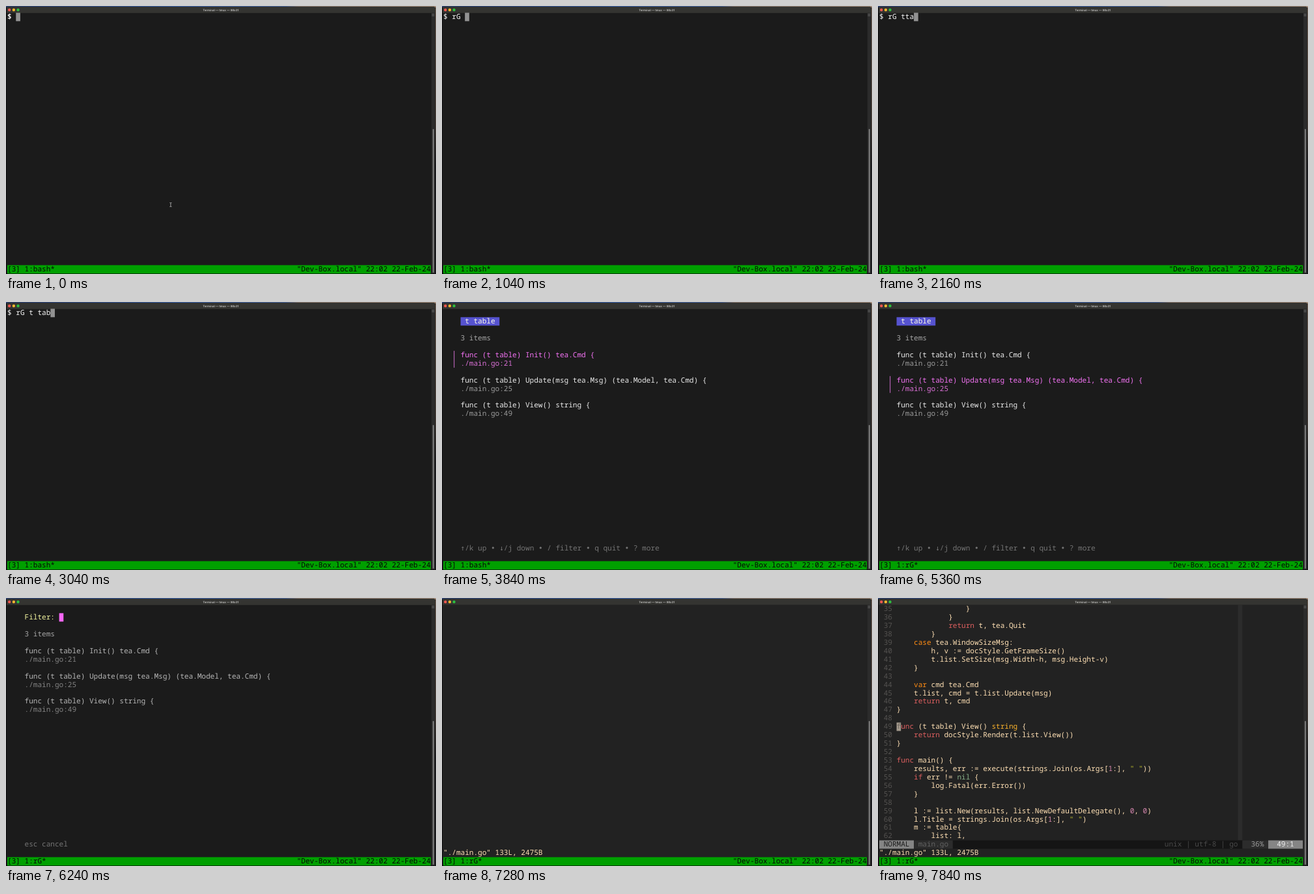
Write an HTML page that moves like this. It is 660 by 412 pixels and loops after 8 s.

```html
<!DOCTYPE html>
<html lang="en">
<head>
<meta charset="utf-8">
<title>Terminal list</title>
<style>
  html, body { margin: 0; width: 100%; height: 100%; overflow: hidden; background: #1b1b1b; }
  svg { display: block; width: 660px; height: 412px; }
  text { white-space: pre; text-rendering: geometricPrecision; }
  #screen text { font: 500 11.055px "Noto Sans Mono", "Liberation Mono", monospace; }
  #screen .bold { font-weight: 700; }
  #screen .symbol { font-family: "DejaVu Sans Mono", monospace; }
  #caption { font: 600 4.4px Inter, "Liberation Sans", sans-serif; }
</style>
</head>
<body>
<svg viewBox="0 0 660 412">
  <defs>
    <linearGradient id="desk">
      <stop offset="0" stop-color="#2a3f70"/>
      <stop offset=".4" stop-color="#3a62aa"/>
      <stop offset=".65" stop-color="#4a669c"/>
      <stop offset=".68" stop-color="#8a7a70"/>
      <stop offset="1" stop-color="#a38d7c"/>
    </linearGradient>
    <linearGradient id="edge" x2="0" y2="1">
      <stop offset="0" stop-color="#6a5a4e"/>
      <stop offset=".45" stop-color="#4a3f38"/>
      <stop offset=".6" stop-color="#141418"/>
    </linearGradient>
  </defs>
  <rect width="660" height="412" fill="#0b0b0d"/>
  <rect x="658.500" width="1.500" height="412" fill="url(#edge)"/>
  <rect width="660" height="2" fill="url(#desk)"/>
  <rect x="1" y="1.200" width="657.500" height="410" rx="2" fill="#1b1b1b"/>
  <path d="M1 10.700V3.200q0-2 2-2H656.500q2 0 2 2v7.500z" fill="#343431"/>
  <circle cx="5.200" cy="6" r="2.200" fill="#f4574f"/>
  <circle cx="11.900" cy="6" r="2.200" fill="#f3b52e"/>
  <circle cx="18.500" cy="6" r="2.200" fill="#2ebd3f"/>
  <text id="caption" x="329.700" y="7.500" text-anchor="middle" fill="#c4c4c2">Terminal — tmux — 98x31</text>
  <g id="screen"></g>
  <rect x="653" y="10.700" width="5.500" height="400.500" fill="#2b2b2b"/>
  <rect x="653.500" y="11.500" width="4" height="4.500" fill="#474747"/>
  <rect x="654.900" y="189" width="2" height="221" rx="1" fill="#7c7c7c"/>
</svg>
<script>
const LOOP = 8000, CELL = 6.633, ROW = 12.933, LEFT = 2, TOP = 10.4;
const screen = document.getElementById('screen');
const escapeXml = s => s.replace(/&/g, '&amp;').replace(/</g, '&lt;');

const box = (col, row, cols, fill, rows = 1) =>
  `<rect x="${LEFT + col * CELL}" y="${TOP + row * ROW}" width="${cols * CELL}" height="${rows * ROW}" fill="${fill}"/>`;

const run = (col, row, s, fill, style = '') =>
  `<text x="${LEFT + col * CELL}" y="${TOP + row * ROW + 9.8}" fill="${fill}" class="${style}">${escapeXml(s)}</text>`;

// Symbols get their own run so that the text after them stays on the grid.
function put(col, row, s, fill, style) {
  return [...s.matchAll(/[\x20-\x7e]+|[^\x20-\x7e]/g)]
    .map(m => run(col + m.index, row, m[0], fill, m[0] > '~' ? 'symbol' : style)).join('');
}

const CURSOR = '#929292';

const typing = [
  [0, ''], [240, 'r'], [720, 'rG'], [1040, 'rG '], [1280, 'rG t'], [1840, 'rG tt'], [1920, 'rG tta'],
  [2320, 'rG tt'], [2400, 'rG t'], [2560, 'rG t '], [2720, 'rG t t'], [2880, 'rG t ta'],
  [2960, 'rG t tab'], [3200, 'rG t tabl'], [3280, 'rG t table']
];
const selection = [[0, 0], [4640, 1], [5120, 2], [5360, 1]];
const at = (steps, t) => steps.filter(([start]) => start <= t).pop()[1];

function prompt(t) {
  const typed = at(typing, t);
  const entered = t >= 3600;
  let out = put(0, 0, '$', '#f8f8f8', typed ? '' : 'bold') + put(2, 0, typed, '#f8f8f8');
  out += entered ? box(0, 1, 1, CURSOR) : box(2 + typed.length, 0, 1, CURSOR);
  if (!typed) out += '<path d="M251.300 302.500h1l.5.500.5-.5h1M252.800 303v5M251.300 308.500h1l.5-.5.5.5h1" fill="none" stroke="#c8c8c8" stroke-width=".8"/>';
  return out;
}

const items = [
  ['func (t table) Init() tea.Cmd {', 21],
  ['func (t table) Update(msg tea.Msg) (tea.Model, tea.Cmd) {', 25],
  ['func (t table) View() string {', 49]
];
const styles = {
  normal: ['#ebebeb', '#9a9a9a'],
  selected: ['#f272f2', '#d86fd4'],
  dim: ['#b6b6b6', '#828282']
};

function item([title, line], index, style) {
  const row = 5 + 3 * index;
  const [main, sub] = styles[style];
  const bar = style === 'selected'
    ? `<rect x="18" y="${TOP + row * ROW}" width="1.2" height="${2 * ROW}" fill="#af5faf"/>` : '';
  return bar + put(4, row, title, main) + put(4, row + 1, './main.go:' + line, sub);
}

const underline = (col, row, fill) =>
  `<rect x="${LEFT + col * CELL}" y="${TOP + row * ROW + 11}" width="${CELL}" height=".8" fill="${fill}"/>`;

const titleBadge = () => box(4, 1, 9, '#5653d0') + put(5, 1, 't table', '#ffffe8');
const footer = s => put(4, 28, s, '#747474');
const count = s => put(4, 3, s, '#a6a6a6');
const filterBar = typed => put(4, 1, 'Filter: ' + typed, '#f5f7a0') + box(12 + typed.length, 1, 1, '#f967f9');

function list(t) {
  if (t < 5920) {
    const chosen = at(selection, t);
    return titleBadge() + count('3 items') +
      items.map((it, i) => item(it, i, i === chosen ? 'selected' : 'normal')).join('') +
      footer('↑/k up • ↓/j down • / filter • q quit • ? more');
  }
  if (t < 6400) {
    return filterBar('') + count('3 items') +
      items.map((it, i) => item(it, i, 'dim')).join('') + footer('esc cancel');
  }
  if (t < 6560) {
    return filterBar('v') + count('1 item • 2 filtered') + item(items[2], 0, 'normal') +
      underline(19, 5, styles.normal[0]) + footer('enter apply filter • esc cancel');
  }
  return titleBadge() + count('“v” 1 item • 2 filtered') + item(items[2], 0, 'selected') +
    underline(19, 5, styles.selected[0]) +
    footer('↑/k up • ↓/j down • / filter • esc clear filter • q quit • ? more');
}

const code = `                }
            }
            return t, tea.Quit
        }
    case tea.WindowSizeMsg:
        h, v := docStyle.GetFrameSize()
        t.list.SetSize(msg.Width-h, msg.Height-v)
    }

    var cmd tea.Cmd
    t.list, cmd = t.list.Update(msg)
    return t, cmd
}

func (t table) View() string {
    return docStyle.Render(t.list.View())
}

func main() {
    results, err := execute(strings.Join(os.Args[1:], " "))
    if err != nil {
        log.Fatal(err.Error())
    }

    l := list.New(results, list.NewDefaultDelegate(), 0, 0)
    l.Title = strings.Join(os.Args[1:], " ")
    m := table{
        list: l,`.split('\n');
const FIRST_LINE = 35, CODE_FG = '#ffe0b4';
const syntax = [
  [/^(return|func|if)$/, '#dc5f5f'],
  [/^(case|var)$/, '#ff8c14'],
  [/^string$/, '#fbb32c'],
  [/^nil$/, '#87af87'],
  [/^\d+$/, '#d787af'],
  [/^"/, '#b4b42a']
];
const colour = token => (syntax.find(([re]) => re.test(token)) || [0, CODE_FG])[1];

function codeLine(source, row) {
  const tokens = source.matchAll(/"[^"]*"|\w+|[^\w\s"]+/g);
  return put(1, row, String(FIRST_LINE + row), '#545250') +
    [...tokens].map(m => put(4 + m.index, row, m[0], colour(m[0]))).join('');
}

function statusLine() {
  const light = '#858585', mid = '#2c2c2c', dark = '#151515', faint = '#484848';
  return box(0, 28, 98, dark) + box(0, 28, 8, light) + box(8, 28, 9, mid) +
    box(84, 28, 6, mid) + box(90, 28, 8, light) +
    put(1, 28, 'NORMAL', '#1c1c1c') + put(9, 28, 'main.go', '#626262') +
    put(66, 28, 'unix | utf-8 | go', faint) + put(86, 28, '36%', '#9a9a9a') + put(92, 28, '49:1', '#f0f0f0');
}

function editor(t) {
  let out = `<rect x="1" y="10.7" width="652" height="387.700" fill="#222"/>`;
  if (t >= 7440) {
    out += box(83, 0, 1, '#2c2c2c', 28) + code.map(codeLine).join('') +
      box(4, 14, 1, '#a39a8d') + put(4, 14, 'f', '#6c655d') + statusLine();
  }
  return out + put(0, 29, '"./main.go" 133L, 2475B', CODE_FG);
}

function tmuxBar(t) {
  const right = '"Dev-Box.local" 22:02 22-Feb-24';
  return box(0, 30, 98, '#00a000') + put(0, 30, `[3] 1:${t < 4240 ? 'bash' : 'rG'}*`, '#050805') +
    put(98 - right.length, 30, right, '#050805');
}

let shown = '';
function draw(t) {
  const view = t < 3840 ? prompt : t < 7280 ? list : editor;
  const markup = view(t) + tmuxBar(t);
  if (markup !== shown) screen.innerHTML = shown = markup;
}

const start = performance.now();
function tick(now) {
  draw(Math.max(0, now - start) % LOOP);
  requestAnimationFrame(tick);
}
draw(0);
requestAnimationFrame(tick);
</script>
</body>
</html>
```
